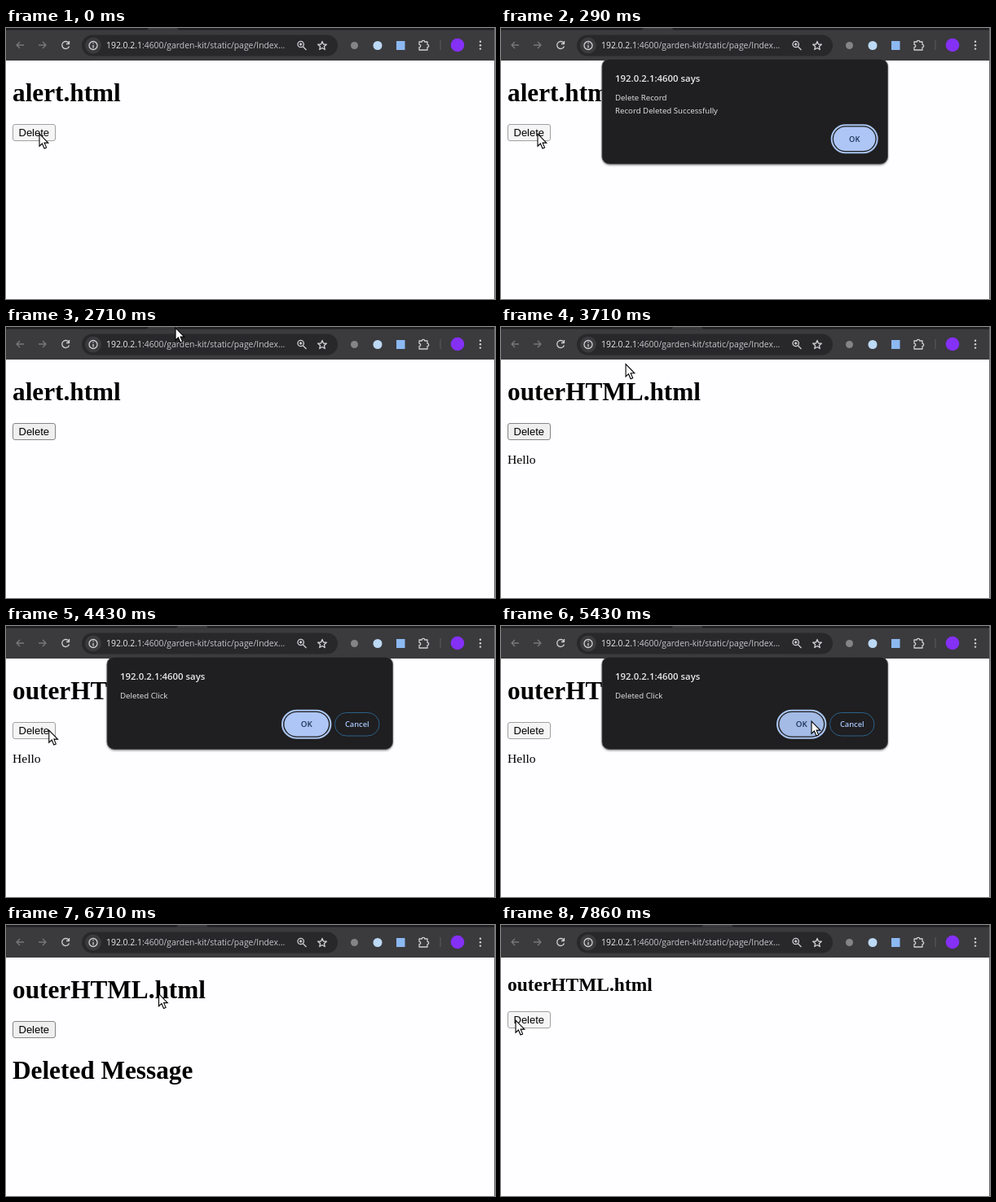
An HTML page for the animation above (8 s loop, 600 by 333 pixels).

```html
<!DOCTYPE html>
<html lang="en">
<head>
<meta charset="utf-8">
<title>Browser dialogs</title>
<style>
  html, body { margin: 0; height: 100%; overflow: hidden; background: #fefdff; }
  svg { display: block; width: 100%; height: 100%; }
  text { white-space: pre; }
  .page { font-family: "Liberation Serif", serif; fill: #000; }
  .heading { font-weight: 700; font-size: 31.25px; }
  .label { font: 13px "Liberation Sans", sans-serif; fill: #000; }
  .ui { font-family: "Open Sans", sans-serif; fill: #e9e9ea; font-size: 9.7px; }
  .title { font-size: 11.4px; font-weight: 600; }
  .action { font-size: 9.3px; font-weight: 600; text-anchor: middle; }
  .icon { fill: none; stroke: #d0cfd2; stroke-width: 1.3; stroke-linejoin: round; }
  .dim { stroke: #78777a; }
</style>
</head>
<body>
<svg viewBox="0 0 600 333">
  <defs>
    <filter id="shadow" x="-5%" y="-5%" width="110%" height="115%" color-interpolation-filters="sRGB">
      <feDropShadow dx="0" dy="1.2" stdDeviation="1.3" flood-opacity=".45"/>
    </filter>
  </defs>
  <rect width="600" height="333" fill="#fefdff"/>

  <g class="page">
    <text id="heading" class="heading" x="8"></text>
    <text id="hello" x="8" y="168" font-size="15.6">Hello</text>
    <text id="message" class="heading" x="8" y="189">Deleted Message</text>
  </g>
  <g id="button">
    <rect id="buttonFace" x="8.5" y="118.5" width="52" height="20" rx="2.5"/>
    <text class="label" x="15.5" y="133">Delete</text>
  </g>

  <rect width="600" height="40" fill="#3b3a3d"/>
  <rect width="600" height="2.5" fill="#1f1e21"/>
  <path id="tab" d="M-1 2.5Q2 2.5 3 0H38Q39 2.5 42 2.5Z" fill="#3b3a3d"/>
  <rect x="93" y="8.5" width="314" height="26" rx="13" fill="#28272a"/>
  <circle cx="107" cy="21.5" r="10" fill="#3b3a3d"/>
  <g class="icon">
    <path class="dim" d="M22 21H13M17 17L13 21L17 25M40 21H49M45 17L49 21L45 25"/>
    <path d="M77 18.5A4.5 4.5 0 1 0 77.5 22.5M77.5 16V19.5H74"/>
    <circle cx="107" cy="21.5" r="5"/>
    <path d="M107 21V24.5M107 18.3V19.6"/>
    <circle cx="361.7" cy="20" r="3.7"/>
    <path d="M364.5 23L368.5 27M360 20H363.4M361.7 18.3V21.7"/>
    <path id="star"/>
    <path d="M507 17H510.3A1.7 1.7 0 0 1 513.7 17H517V20.3A1.7 1.7 0 0 1 517 23.7V27H507V23.7A1.7 1.7 0 0 0 507 20.3Z"/>
  </g>
  <circle cx="427.5" cy="21.5" r="4.5" fill="#858487"/>
  <circle cx="456" cy="21.5" r="5.5" fill="#bcd9f5"/>
  <rect x="479" y="16" width="10.5" height="11" fill="#8cb9f2"/>
  <path d="M533 15V27" stroke="#5d5c60"/>
  <circle cx="554" cy="21" r="8.3" fill="#8430f6"/>
  <g fill="#d0cfd2">
    <circle cx="582" cy="16.8" r="1.2"/><circle cx="582" cy="21.2" r="1.2"/><circle cx="582" cy="25.6" r="1.2"/>
  </g>
  <text class="ui" x="123" y="25.2" style="font-size:10.4px">192.0.2.1<tspan fill="#c6c5c9">:4600/garden-kit/static/page/Index...</tspan></text>
  <path d="M599.5 0V333" stroke="#69686b"/>

  <g id="dialog" class="ui">
    <rect id="panel" x="124" y="38" width="350.5" rx="9" fill="#1f1e20" stroke="#4b4a4d" stroke-width=".8" filter="url(#shadow)"/>
    <text class="title" x="140" y="66.2">192.0.2.1:4600 says</text>
    <text id="line1" x="140" y="89.3"></text>
    <text id="line2" x="140" y="105">Record Deleted Successfully</text>
    <g id="ok">
      <rect id="okRing" x="-28" y="-17" width="56" height="34" rx="17" fill="none" stroke="#a8c4f0" stroke-width="2"/>
      <rect id="okFace" x="-25.7" y="-14.8" width="51.4" height="29.6" rx="14.8"/>
      <text class="action" y="3.4" style="fill:#1c3157">OK</text>
    </g>
    <g id="cancel">
      <rect x="403.5" y="106.5" width="54.5" height="28.5" rx="14.2" fill="none" stroke="#2b6288"/>
      <text class="action" x="430.8" y="124.4" style="fill:#a8c7fa">Cancel</text>
    </g>
  </g>

  <path id="cursor" d="M0 0V15.2L3.4 12L6 18L8.6 16.9L6.1 11.1H10.8Z" fill="#fff" stroke="#000" stroke-width="1.1"/>
</svg>

<script>
const LOOP = 8000, STEP = 1000 / 7;
const $ = id => document.getElementById(id);
const set = (id, attrs) => {
  for (const name in attrs) $(id).setAttribute(name, attrs[name]);
};
const show = (id, on) => set(id, { visibility: on ? "inherit" : "hidden" });
const move = (id, x, y) => set(id, { transform: `translate(${x} ${y})` });

// Pointer stops: step, x, y
const stops = [
  [0, 41, 130], [2, 45, 130], [3, 47, 130], [8, 442, 130], [17, 443, 130],
  [19, 208, 1], [24, 208, 1], [29, 52, 128], [32, 53, 128], [38, 381, 117],
  [41, 381, 117], [44, 14, 167], [46, 120, 168], [48, 255, 1], [50, 255, 1],
  [55, 18, 117], [56, 18, 117]
];

// Dialog spans; fade gives the opacity of each closing step
const dialogs = [
  { open: 1, fade: { 17: .3 }, end: 18, confirm: false },
  { open: 30, fade: { 40: .75, 41: .075 }, end: 42, confirm: true }
];

function pointerAt(step) {
  const next = Math.max(1, stops.findIndex(s => s[0] >= step));
  const [a, ax, ay] = stops[next - 1], [b, bx, by] = stops[next];
  const u = (step - a) / (b - a), k = u * u * (3 - 2 * u);
  return [ax + (bx - ax) * k, ay + (by - ay) * k];
}

function drawPage(step, pressed) {
  const page = step < 21 ? 0 : step < 50 ? 1 : 2;
  const small = page === 2;
  $("heading").textContent = page ? "outerHTML.html" : "alert.html";
  $("heading").style.fontSize = small ? "23.45px" : "";
  set("heading", { y: small ? 81 : 90.3 });
  show("hello", page === 1 && step < 40);
  show("message", page === 1 && step >= 40);
  move("button", 0, small ? -12 : 0);
  set("buttonFace", pressed
    ? { fill: "#f5f5f5", stroke: "#a0a0a0" }
    : { fill: "#efefef", stroke: "#858585" });
  move("tab", [172, 208, 245][page], 0);
}

function drawDialog(step, dialog) {
  show("dialog", dialog);
  if (!dialog) return;
  const { confirm, open, fade } = dialog;
  const opacity = fade[step] ?? (step === open ? .85 : 1);
  const closing = step in fade;
  const leaving = closing ? (1 - opacity) / .925 : 0;
  const scale = 1 + .012 * leaving;
  set("dialog", {
    opacity,
    transform: `translate(${299.5 * (1 - scale)} ${-15 * leaving}) scale(${scale})`
  });
  set("panel", { height: confirm ? 113.5 : 129 });
  $("line1").textContent = confirm ? "Deleted Click" : "Delete Record";
  show("line2", !confirm);
  show("cancel", confirm);
  show("okRing", !closing);
  set("ok", { transform: confirm ? "translate(368.7 120.8) scale(1.06 1)" : "translate(433.7 136.3)" });
  const hover = confirm ? step >= 38 : step >= 8;
  set("okFace", { fill: hover ? "#a3bbe5" : "#adc6f6" });
}

function draw(now) {
  const step = Math.floor(((now % LOOP) + 5) / STEP) % 56;
  const dialog = dialogs.find(d => step >= d.open && step < d.end);
  drawPage(step, step === 0 || step === 55 || (dialog && !(step in dialog.fade)));
  drawDialog(step, dialog);
  move("cursor", ...pointerAt(step));
}

const starPoints = Array.from({ length: 10 }, (_, i) => {
  const r = i % 2 ? 2.5 : 5.6, angle = (i / 5 - .5) * Math.PI;
  return `${388 + r * Math.cos(angle)} ${22 + r * Math.sin(angle)}`;
});
set("star", { d: `M${starPoints.join("L")}Z` });

const start = performance.now();
function tick() {
  draw(performance.now() - start);
  requestAnimationFrame(tick);
}
tick();
</script>
</body>
</html>
```
